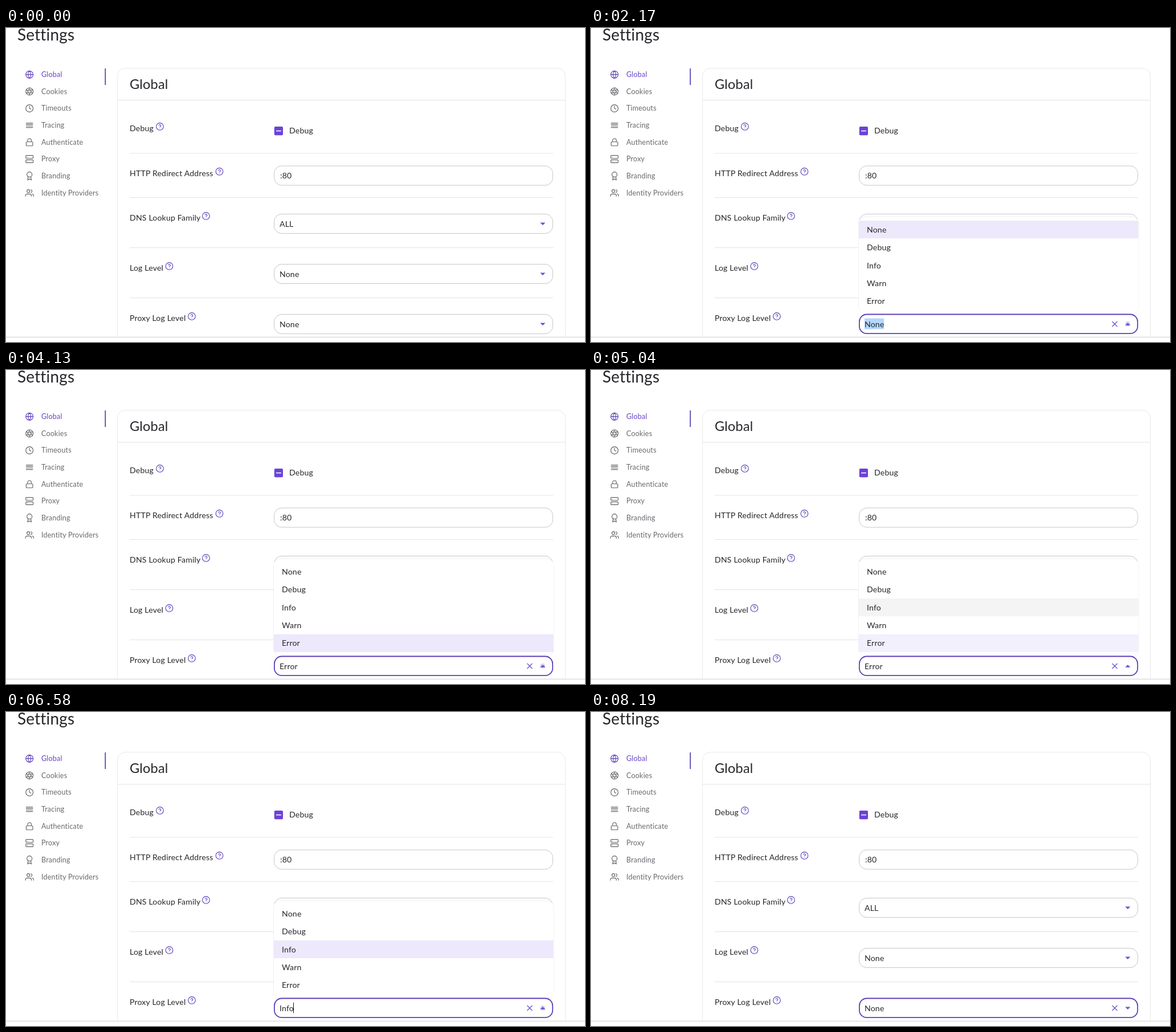
An HTML page for the animation above (8750 ms loop, 1016x551 px).

```html
<!DOCTYPE html>
<html lang="en">
<head>
<meta charset="utf-8">
<title>Settings</title>
<style>
  html, body { margin: 0; width: 100%; height: 100%; overflow: hidden; background: #fff; }
  svg {
    display: block; width: 1016px; height: 551px; fill: #27272c;
    font: 14.1px Lato, "Open Sans", sans-serif; letter-spacing: .012em; font-variant-ligatures: none;
  }
  .line { fill: none; stroke: #e3e3e5; }
  .icon { fill: none; stroke: #626268; stroke-width: 1.8; stroke-linecap: round; stroke-linejoin: round; }
  .icon.accent { stroke: #5d3fb8; }
  .nav { font-size: 12.6px; fill: #6a6a70; }
  .nav.accent { fill: #6a45c4; }
</style>
</head>
<body>
<svg viewBox="0 0 1016 551">
  <defs><clipPath id="page"><rect width="1016" height="542"/></clipPath></defs>
  <g id="fixed" clip-path="url(#page)"></g>
  <g id="live"></g>
  <path d="M0 542.5H1016" stroke="#dddde0" stroke-width="1.5"/>
</svg>
<script>
const LOOP = 8750;
const ACCENT = '#5d40b8';
const ARROW = '#6a4fd4';
const OPTIONS = ['None', 'Debug', 'Info', 'Warn', 'Error'];
const CARET_X = { None: 513.5, Error: 511.5, Info: 504.5 };

// Timed states: [start, value] or [start, end, value]
const VALUES = [[0, 'None'], [3360, 'Error'], [5530, 'Info'], [7630, 'None']];
const OPENINGS = [[2170, 3360, 2520], [4130, 5530, 4620], [6580, 7630, 6860]]; // third item: ripple end
const CARETS = [[1540, 2170], [3360, 3920], [4410, 4970], [5530, 6090], [6580, 7140], [7630, 8190]];
const POINTED = [[2170, 'None'], [2310, 'Error'], [4130, 'Error'], [4270, 'Warn'],
                 [4340, 'Info'], [6580, 'Info'], [6650, 'Debug'], [6720, 'None']];
const HOVERS = [[5530, 5880, 'log'], [7630, 7980, 'dns'], [7980, 8050, 'log']];

const latest = (list, t) => list.filter(([start]) => start <= t).pop()?.[1];
const during = (list, t) => list.find(([start, end]) => t >= start && t < end);

const text = (x, y, s, attrs = '') => `<text x="${x}" y="${y}" ${attrs}>${s}</text>`;
const rect = (x, y, w, h, fill, r = 0, attrs = '') =>
  `<rect x="${x}" y="${y}" width="${w}" height="${h}" rx="${r}" fill="${fill}" ${attrs}/>`;
const icon = (cx, cy, body, accent, scale = 0.64) =>
  `<g class="icon ${accent ? 'accent' : ''}" transform="translate(${cx} ${cy}) scale(${scale}) translate(-12 -12)">${body}</g>`;
const path = d => `<path d="${d}"/>`;
const circle = (x, y, r) => `<circle cx="${x}" cy="${y}" r="${r}"/>`;

const RING = circle(12, 12, 10);
const HELP = RING + path('M9.09 9a3 3 0 0 1 5.83 1c0 2-3 3-3 3M12 17h.01');
const NAV = [
  ['Global', RING + path('M2 12h20M12 2a15.3 15.3 0 0 1 4 10 15.3 15.3 0 0 1-4 10 15.3 15.3 0 0 1-4-10 15.3 15.3 0 0 1 4-10z')],
  ['Cookies', RING + path('M14.31 8l5.74 9.94M9.69 8h11.48M7.38 12l5.74-9.94M9.69 16L3.95 6.06M14.31 16H2.83M16.62 12l-5.74 9.94')],
  ['Timeouts', RING + path('M12 6v6l4 2')],
  ['Tracing', path('M3 6h18M3 10h18M3 14h18M3 18h18')],
  ['Authenticate', path('M5 11h14a2 2 0 0 1 2 2v7a2 2 0 0 1-2 2H5a2 2 0 0 1-2-2v-7a2 2 0 0 1 2-2zM7 11V7a5 5 0 0 1 10 0v4')],
  ['Proxy', rect(2, 2, 20, 8, 'none', 2) + rect(2, 14, 20, 8, 'none', 2) + path('M6 6h.01M6 18h.01')],
  ['Branding', circle(12, 8, 7) + path('M8.21 13.89L7 23l5-3 5 3-1.21-9.12')],
  ['Identity Providers', path('M17 21v-2a4 4 0 0 0-4-4H5a4 4 0 0 0-4 4v2M23 21v-2a4 4 0 0 0-3-3.87M16 3.13a4 4 0 0 1 0 7.75') + circle(9, 7, 4)]
];
// label, label centre y, help icon x
const ROWS = [['Debug', 176, 270], ['HTTP Redirect Address', 255, 374.5], ['DNS Lookup Family', 333, 351],
              ['Log Level', 421, 286.5], ['Proxy Log Level', 509, 326]];

function box(y, state) {
  return state === 'focus'
    ? rect(470.9, y + .5, 488.3, 33.7, '#fff', 13, `stroke="${ACCENT}" stroke-width="1.8"`)
    : rect(470.5, y + .5, 489, 34, '#fff', 13.5, `stroke="${state === 'hover' ? '#2c2c30' : '#c6c6c9'}"`);
}

function select(y, value, state, open) {
  const mid = y + 17.5;
  const clear = state ? `<path d="M914.5 ${mid - 4.5}l9 9m0-9l-9 9" stroke="${ARROW}" stroke-width="1.3"/>` : '';
  const arrow = open ? `M937.3 ${mid + 2.3}h9.2l-4.6-4.6z` : `M937.3 ${mid - 2}h9.2l-4.6 4.6z`;
  return text(480, mid + 5, value) + clear + `<path d="${arrow}" fill="${ARROW}"/>`;
}

function fixedParts() {
  const nav = NAV.map(([label, body], i) => {
    const y = 81.5 + i * 29.67;
    return icon(41.2, y + .2, body, !i) + text(62, y + 4.4, label, `class="nav ${i ? '' : 'accent'}"`);
  }).join('');
  const rows = ROWS.map(([label, y, helpX]) =>
    text(217, y + 5, label) + icon(helpX, y - 3.1, HELP, true, .63)).join('');
  const dividers = [220, 297.5, 385.5, 473.5].map(y => `M217 ${y}H960`).join('');
  return text(20, 22, 'Settings', 'font-size="28"') + nav + rect(173.4, 71, 1.8, 29, ACCENT) +
    rect(195.5, 70.5, 786, 520, '#fff', 14, 'stroke="#e9e9eb"') +
    `<path class="line" d="M196 126.8H981${dividers}"/>` +
    text(217, 107, 'Global', 'font-size="23.6"') + rows +
    rect(470.8, 173, 15.2, 15.2, '#6b43d8', 2) + rect(474, 179.8, 8.8, 1.6, '#fff') +
    text(497, 185.4, 'Debug') + box(241.5) + text(481, 263.5, ':80');
}

function menu(value, pointed) {
  const step = 31.4;
  const items = OPTIONS.map((option, i) => {
    const y = 338 + i * step;
    const active = option === pointed;
    const fill = option === value ? (active ? '#eee8fc' : '#f3f0fd') : active ? '#f4f4f4' : '#fff';
    return rect(470, y, 490.5, step, fill) + text(484, y + 20.8, option);
  }).join('');
  return rect(469.5, 331, 491.5, 171, '#fff', 12, 'stroke="#f0f0f2"') + items;
}

function ripple([start, , end], t) {
  if (t >= end) return '';
  const age = Math.min(3, Math.floor((t - start) / 70));
  const radius = 11 - 6.5 * (1 - age / 3) ** 2;
  return `<circle cx="941.8" cy="519.3" r="${radius}" fill="${ARROW}" fill-opacity="${.24 - age * .04}"/>`;
}

function liveParts(t) {
  const value = latest(VALUES, t);
  const opening = during(OPENINGS, t);
  const hovered = during(HOVERS, t)?.[2];
  const focus = t >= 1540 ? 'focus' : '';
  const dns = hovered === 'dns' ? 'hover' : '';
  const log = hovered === 'log' ? 'hover' : '';
  const textSelected = opening === OPENINGS[0];
  return box(326, dns) + select(326, 'ALL', dns) + box(414, log) + select(414, 'None', log) +
    (opening ? menu(value, latest(POINTED, t)) : '') +
    box(502, focus) +
    (textSelected ? rect(480, 509.5, 34, 19, '#b3d7fe') : '') +
    (opening ? ripple(opening, t) : '') +
    select(502, value, focus, opening) +
    (during(CARETS, t) ? rect(CARET_X[value] - .5, 510, 1, 18.5, '#111') : '');
}

const live = document.getElementById('live');
let shown = '';
document.getElementById('fixed').innerHTML = fixedParts();

function draw() {
  const markup = liveParts(performance.now() % LOOP);
  if (markup !== shown) live.innerHTML = shown = markup;
  requestAnimationFrame(draw);
}
draw();
</script>
</body>
</html>
```
